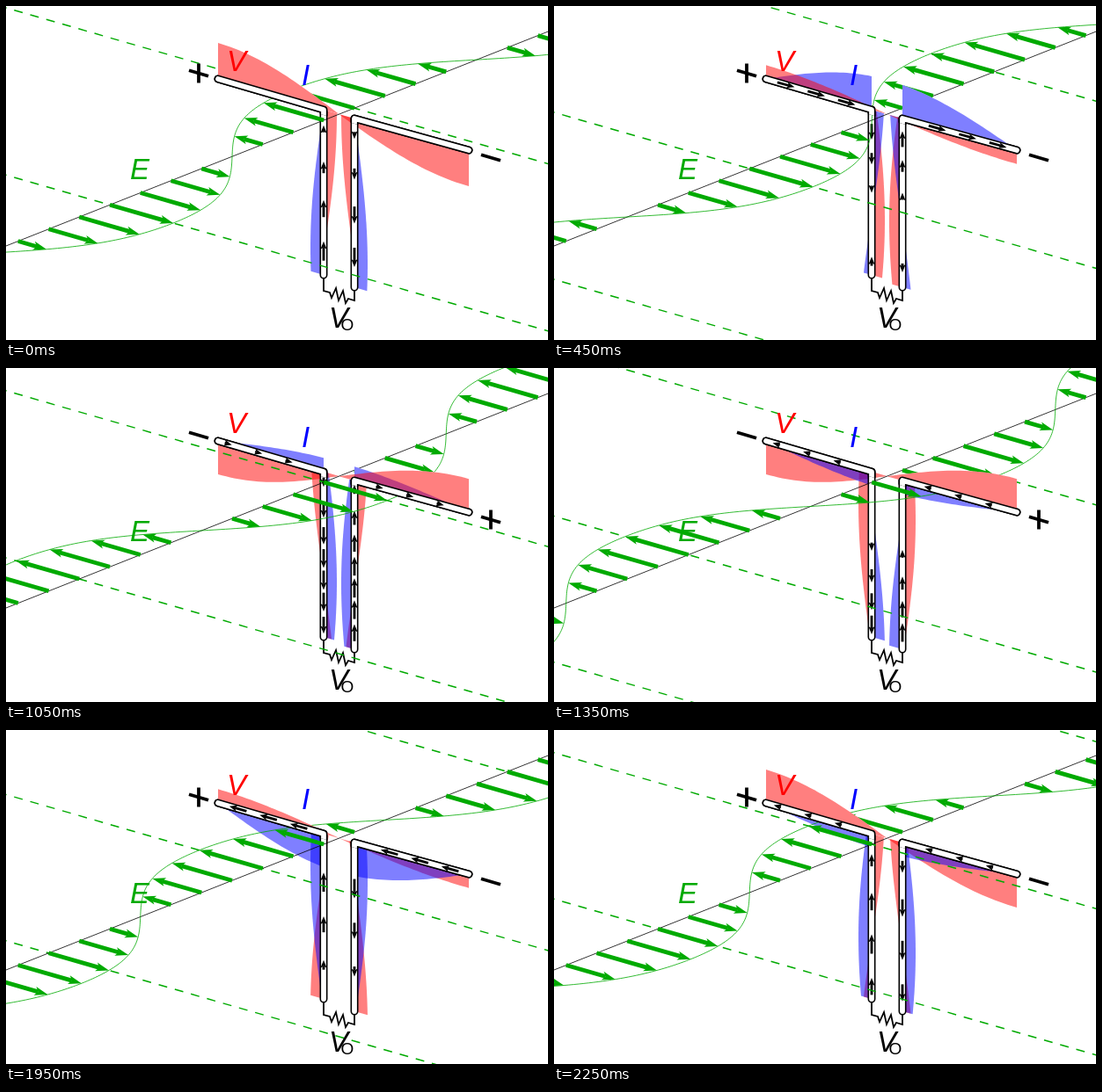
Recreate the animation shown at these times as an HTML page with a canvas. Size 616 by 380 pixels, loop 2400 ms.

```html
<!DOCTYPE html>
<html lang="en">
<head>
<meta charset="utf-8">
<title>Dipole antenna receiving a wave</title>
<style>
html, body { margin: 0; height: 100%; overflow: hidden; background: #fff; }
canvas { display: block; }
</style>
</head>
<body>
<canvas id="stage" width="616" height="380"></canvas>
<script>
const ctx = document.getElementById('stage').getContext('2d');
const STEPS = 16, STEP_MS = 150, TAU = Math.PI * 2;
const GREEN = '#00aa00', RED = 'rgba(255,0,0,.5)', BLUE = 'rgba(0,0,255,.5)';
const SLOPE = 0.288;                    // direction of the electric field
const WAVE = 556, GRID = WAVE / STEPS, CREST = 118;
const MID = 378.5;                      // centre of the dipole
const DELAY = 0.0097;                   // phase per pixel down the feed line
const axisY = x => 273 - 0.396 * x;
const armY = x => x < MID ? 83 + (x - 241) * 0.291 : 128 + (x - 396) * 0.277;
const span = x => (x - MID) / (x < MID ? 137.5 : 147.5);
const voltage = x => -Math.sin(span(x) * Math.PI / 2);
const current = x => Math.cos(span(x) * Math.PI / 2);
const LINES = [
  { x: 361, top: 118, bottom: 306, side: 1, first: 133 },
  { x: 396, top: 128, bottom: 320, side: -1, first: 141 }
];
const ARMS = [
  { end: [241, 83], corner: [361, 118], from: 246, to: 354, first: 236 },
  { end: [526, 164], corner: [396, 128], from: 402, to: 520, first: 408 }
];

function trace(points) {
  ctx.beginPath();
  points.forEach(([x, y]) => ctx.lineTo(x, y));
}

function stroke(points, color, width) {
  trace(points);
  ctx.strokeStyle = color;
  ctx.lineWidth = width;
  ctx.stroke();
}

function fill(points, color) {
  trace(points);
  ctx.fillStyle = color;
  ctx.fill();
}

function sample(from, to, count, fn) {
  return Array.from({ length: count + 1 }, (_, i) => fn(from + (to - from) * i / count));
}

function arrow(x0, y0, x1, y1, color, stem, head, half) {
  const length = Math.hypot(x1 - x0, y1 - y0);
  ctx.save();
  ctx.translate(x1, y1);
  ctx.rotate(Math.atan2(y1 - y0, x1 - x0));
  ctx.fillStyle = color;
  const neck = head * 0.75;
  if (length > neck) ctx.fillRect(-length, -stem / 2, length - neck, stem);
  fill([[0, 0], [-head, -half], [-neck, 0], [-head, half]], color);
  ctx.restore();
}

// Black arrow for the current, centred at x, y along the unit vector dx, dy
function currentArrow(x, y, dx, dy, value) {
  if (Math.abs(value) < 0.1) return;
  const reach = Math.sign(value) * Math.max(8, 22 * Math.abs(value)) / 2;
  arrow(x - dx * reach, y - dy * reach, x + dx * reach, y + dy * reach, '#000', 2.8, 9, 3.6);
}

function conductor(i) {
  const points = [ARMS[i].end, ARMS[i].corner, [LINES[i].x, LINES[i].bottom]];
  ctx.lineCap = 'round';
  stroke(points, '#000', 9);
  stroke(points, '#fff', 5.8);
  ctx.lineCap = 'butt';
}

// The arrows swing to and fro with the charges they stand for
function armArrows({ from, to, first }, side, phase) {
  for (let n = -1; n < 5; n++) {
    const x = first + 34.5 * n - 18 * side * Math.cos(phase) * side;
    if (x > from && x < to) currentArrow(x, armY(x), 0.961, 0.275, Math.sin(phase));
  }
}

function lineArrows({ x, top, bottom, side, first }, phase) {
  for (let n = -1; n < 7; n++) {
    const rest = first + 36.5 * n;
    const y = rest - 34 * side * Math.cos(phase - (rest - top) * DELAY) * side;
    if (y > top + 7 && y < bottom - 4)
      currentArrow(x, y, 0, side, Math.sin(phase - (y - top) * DELAY));
  }
}

function feedLine({ x, top, bottom, side }, phase, color) {
  const edge = sample(top, bottom, 30, y => {
    const d = 15 * side * Math.cos(phase - (y - top) * DELAY);
    return [x + d, y + d * SLOPE];
  });
  fill([[x, top], ...edge, [x, bottom]], color);
}

function armFills(phase) {
  const fills = [];
  const add = (from, to, shape, size, color) => fills.push({
    up: shape((from + to) / 2) * size > 0,
    color,
    points: [
      [from, armY(from)],
      ...sample(from, to, 30, x => [x, armY(x) - size * shape(x)]),
      [to, armY(to)]
    ]
  });
  const v = 41 * Math.cos(phase), i = 42 * Math.sin(phase);
  add(241, 361, current, i, BLUE);
  add(396, 526, current, i, BLUE);
  add(241, MID - 0.01, voltage, v, RED);
  add(MID, 526, voltage, v, RED);
  return fills;
}

function fieldWave(step) {
  const crest = CREST + GRID * step;
  const field = s => {
    const angle = (s - crest) / WAVE * TAU;
    return 75.5 * Math.cos(angle) - 3.5 * Math.cos(3 * angle);
  };
  const tip = s => [s + field(s), axisY(s) + field(s) * SLOPE];

  ctx.setLineDash([10, 9]);
  for (const s of [crest + WAVE / 2, crest, crest - WAVE / 2, crest - WAVE + GRID]) {
    const y = x => axisY(s) + (x - s) * SLOPE;
    stroke([[-9, y(-9)], [640, y(640)]], GREEN, 1.5);
  }
  ctx.setLineDash([]);
  stroke([[0, axisY(0)], [616, axisY(616)]], '#000', 0.8);
  stroke(sample(-140, 760, 280, tip), GREEN, 0.8);
  for (let n = -6; n < 18; n++) {
    const s = CREST + GRID * n;
    if (Math.abs(field(s)) > 5) arrow(s, axisY(s), ...tip(s), GREEN, 4.8, 15, 5);
  }
}

function sign(x, y, plus) {
  stroke([[x - 11, y - 3.3], [x + 11, y + 3.3]], '#000', 3.8);
  if (plus) stroke([[x, y - 11], [x, y + 11]], '#000', 3.8);
}

function label(text, x, y, size, color, style = 'italic') {
  ctx.font = `${style} ${size}px "Liberation Sans", Arial, sans-serif`;
  ctx.fillStyle = color;
  ctx.fillText(text, x, y);
}

function draw(step) {
  const phase = step / STEPS * TAU;
  const fills = armFills(phase);
  const upper = fills.filter(f => f.up);
  const lower = fills.filter(f => !f.up).reverse();
  ctx.fillStyle = '#fff';
  ctx.fillRect(0, 0, 616, 380);

  ctx.lineJoin = 'miter';
  stroke([[361, 308], [361, 324], [368, 326], [370, 332], [375, 321], [378, 335],
    [383, 324], [386, 338], [389, 333], [396, 335], [396, 322]], '#000', 1.8);
  ctx.lineJoin = 'round';

  // Below the plane of the wave
  for (const line of LINES) {
    feedLine(line, phase, RED);
    feedLine(line, phase - TAU / 4, BLUE);
  }
  lower.forEach(f => fill(f.points, f.color));
  LINES.forEach((line, i) => {
    conductor(i);
    lineArrows(line, phase);
  });

  fieldWave(step);

  // Above the plane of the wave
  upper.forEach(f => fill(f.points, '#fff'));
  upper.forEach(f => fill(f.points, f.color));
  ARMS.forEach((arm, i) => {
    const [left, right] = i ? [390, 540] : [230, 367];
    ctx.save();
    trace([[left, 0], [right, 0], [right, armY(right) + 6], [left, armY(left) + 6]]);
    ctx.clip();
    conductor(i);
    lineArrows(LINES[i], phase);
    ctx.restore();
    armArrows(arm, LINES[i].side, phase);
  });

  const swing = Math.cos(phase);
  if (Math.abs(swing) > 0.01) {
    sign(219, 76.5, swing > 0);
    sign(551, 172.5, swing < 0);
  }
  label('V', 251, 74, 33, '#f00');
  label('I', 336, 90, 33, '#00f');
  label('E', 141, 197, 33, GREEN);
  label('V', 367, 366, 33, '#000');
  label('O', 380.5, 369, 19, '#000', 'normal');
}

function tick() {
  draw(Math.floor(performance.now() / STEP_MS) % STEPS);
  requestAnimationFrame(tick);
}
tick();
</script>
</body>
</html>
```
